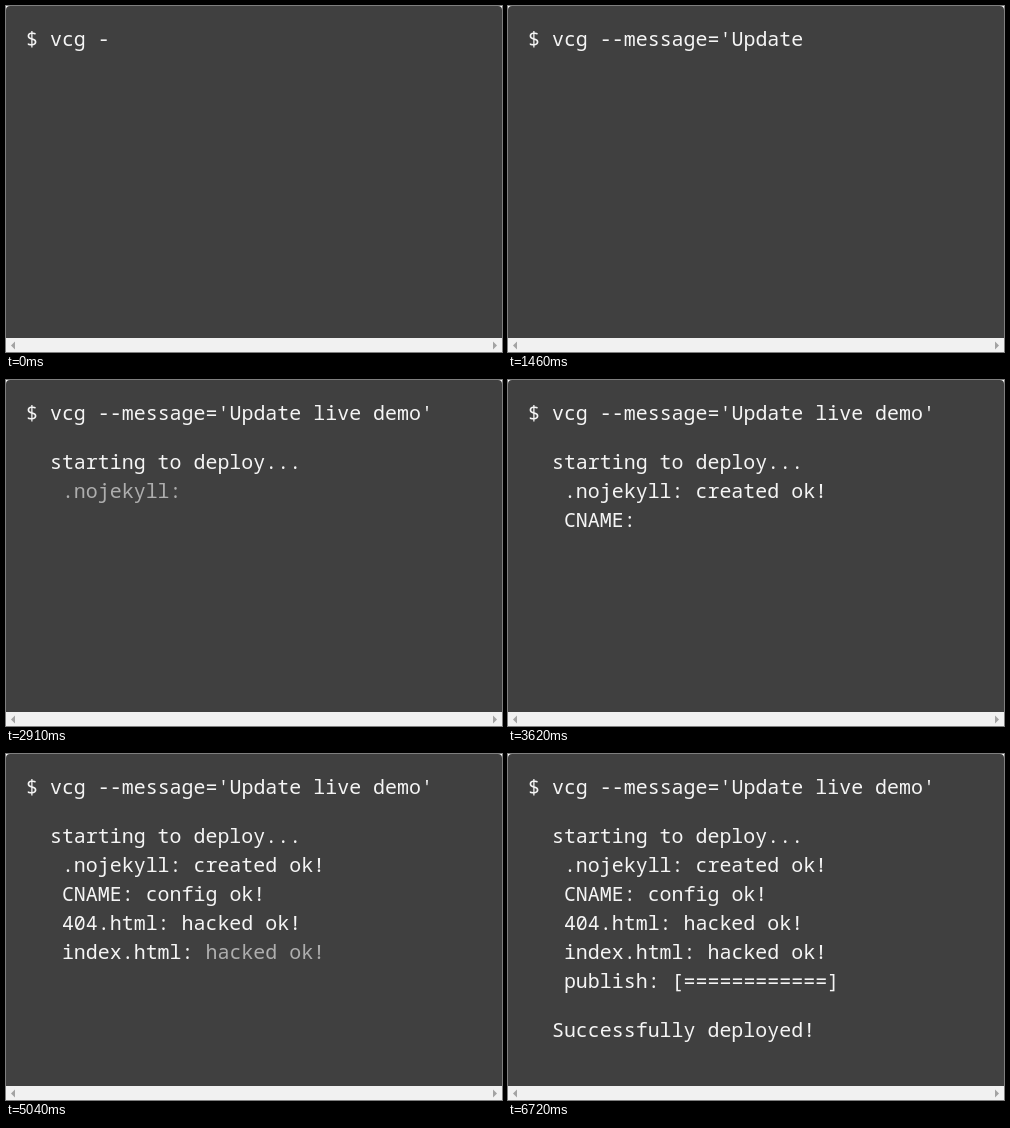
An HTML page that plays this animation: 496 by 346 pixels, repeating every 9.36 s.

```html
<!DOCTYPE html>
<html lang="en">
<head>
<meta charset="utf-8">
<title>Deploy terminal</title>
<style>
  html, body { margin: 0; width: 100%; height: 100%; overflow: hidden; background: #fff; }
  svg { display: block; }
  text {
    font: 500 19.95px "Noto Sans Mono", "DejaVu Sans Mono", monospace;
    font-variant-ligatures: none;
    white-space: pre;
    fill: #f5f5f5;
  }
</style>
</head>
<body>
<svg width="496" height="346" viewBox="0 0 496 346">
  <path fill="#404040" d="M0 332V4Q0 0 4 0H492Q496 0 496 4V332Z"/>
  <g id="screen"></g>
  <rect y="332" width="496" height="14" fill="#f1f1f1"/>
  <path fill="#a3a3a3" d="M9 335.5V343.5L5 339.5ZM487 335.5V343.5L491 339.5Z"/>
</svg>
<script>
const LOOP = 9360, TYPE = 90, FADE = 110;
const screen = document.getElementById('screen');
const parts = [];

function svg(tag, parent, attrs = {}) {
  const el = document.createElementNS('http://www.w3.org/2000/svg', tag);
  for (const key in attrs) el.setAttribute(key, attrs[key]);
  return parent.appendChild(el);
}

const row = y => svg('text', screen, { x: 20, y });
const linear = k => k;
const easeOut = k => 1 - (1 - k) ** 2;

function add(line, text, start, span = FADE, ease = easeOut) {
  const el = svg('tspan', line);
  el.textContent = text;
  parts.push({ el, start, span, ease });
}

function type(line, text, start, step) {
  [...text].forEach((ch, i) => add(line, ch, start + step * i, TYPE, linear));
}

// The command pauses briefly after the opening quote.
const command = row(40);
add(command, '$ vcg -', -FADE);
type(command, "-message='", 74, 78);
type(command, 'U', 920, 0);
type(command, 'pdate live dem', 1034, 80);
type(command, "o'", 2155, 110);

add(row(89), '  starting to deploy...', 2560);

const files = [
  ['.nojekyll:', 'created ok!', 2870, 3160],
  ['CNAME:', 'config ok!', 3470, 3760],
  ['404.html:', 'hacked ok!', 4050, 4370],
  ['index.html:', 'hacked ok!', 4690, 5000]
];
files.forEach(([name, result, shown, done], i) => {
  const line = row(118 + 29 * i);
  add(line, '   ' + name + ' ', shown);
  add(line, result, done);
});

const publish = row(234);
add(publish, '   publish: ', 5310);
type(publish, '[' + '='.repeat(12) + ']', 5402, 80);

add(row(283), '  Successfully deployed!', 6600);

function draw() {
  const t = performance.now() % LOOP;
  for (const { el, start, span, ease } of parts) {
    const k = Math.min(1, Math.max(0, (t - start) / span));
    el.setAttribute('fill-opacity', ease(k).toFixed(3));
  }
  requestAnimationFrame(draw);
}
draw();
</script>
</body>
</html>
```
